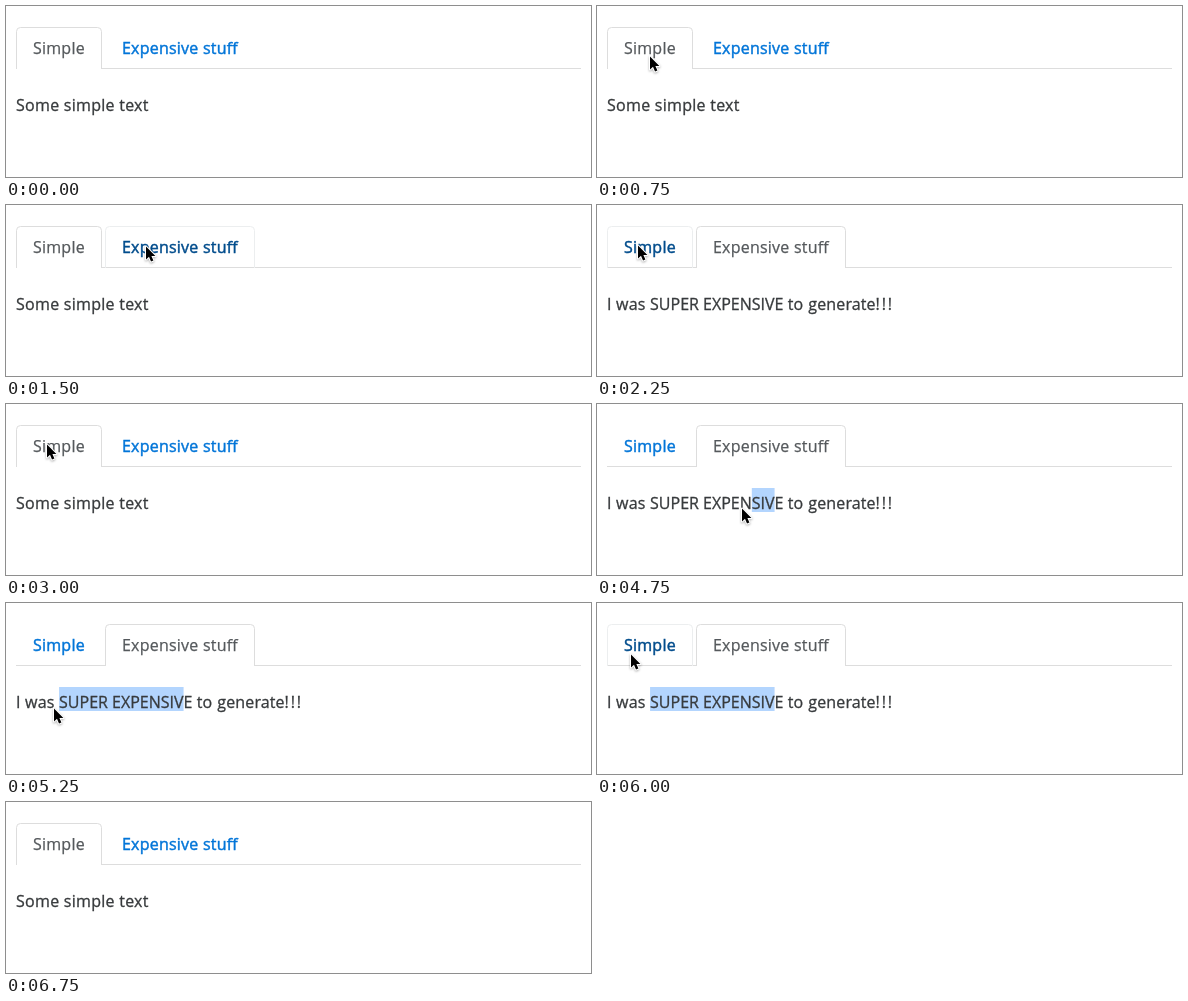
These frames come from a looping animation (585 px wide and 171 px high, 7.5 s). An HTML page:

```html
<!DOCTYPE html>
<html lang="en">
<head>
<meta charset="utf-8">
<title>Lazy tabs</title>
<style>
  html, body { margin: 0; width: 100%; height: 100%; overflow: hidden; background: #fff; }
  svg { display: block; width: 100%; height: 100%; }
  text {
    font: 16px "Open Sans", "Noto Sans", sans-serif;
    font-feature-settings: "liga" 1;
    letter-spacing: .22px;
    color: #373a3c;
    fill: currentColor; stroke: currentColor; stroke-width: .3px;
  }
  .tab path { fill: none; stroke: none; }
  .tab text { color: #0275d8; stroke-width: .45px; }
  .tab.hover path { stroke: #eceeef; }
  .tab.hover text { color: #014c8c; }
  .tab.active path { fill: #fff; stroke: #ddd; }
  .tab.active text { color: #55595c; stroke-width: .25px; }
  #plain { letter-spacing: .27px; }
  .caps { letter-spacing: 0; }
  .verb { letter-spacing: .12px; word-spacing: .9px; }
  .bangs { letter-spacing: 1.8px; }
  #cursor {
    fill: #000; stroke: #fff; stroke-width: 2; paint-order: stroke;
    stroke-linejoin: round;
    filter: drop-shadow(0 1px 1px rgba(0, 0, 0, .3));
  }
</style>
</head>
<body>
<svg viewBox="0 0 585 171">
  <rect id="selection" y="84" height="24" fill="#b3d5fe"/>
  <path d="M10 62.5H575" stroke="#ddd"/>
  <g class="tab" id="simple">
    <path d="M10.5 63V25.5a4 4 0 0 1 4 -4H91.5a4 4 0 0 1 4 4V63"/>
    <text x="27" y="48">Simple</text>
  </g>
  <g class="tab" id="costly">
    <path d="M99.5 63V25.5a4 4 0 0 1 4 -4H244.5a4 4 0 0 1 4 4V63"/>
    <text x="116" y="48">Expensive stuff</text>
  </g>
  <text id="plain" x="10" y="105">Some simple text</text>
  <text id="heavy" x="10" y="105">I was <tspan class="caps">SUPER EXPENSIVE </tspan><tspan class="verb">to generate</tspan><tspan class="bangs">!!!</tspan></text>
  <path id="cursor" d="M1 1.5V14.6L4 11.8L6 16.5L8.4 15.5L6.4 10.9H10.4Z"/>
</svg>
<script>
  const LOOP = 7500, STEP = 250;
  const $ = id => document.getElementById(id);

  // The pointer eases from rest to rest: start time, steps taken, x, y.
  const enter = { time: 250, x: 93, y: 56 }, leave = 6750;
  const moves = [
    [250, 1, 52, 49],
    [750, 3, 139, 40],
    [1750, 2, 40, 39],
    [3000, 3, 134, 39],
    [4000, 2, 176, 100],
    [4500, 1, 144, 103],
    [4750, 1, 61, 103],
    [5000, 1, 47, 104],
    [5500, 2, 33, 50]
  ];
  const clicks = [1750, 3000, 4000, 6500];
  const drag = { start: 4500, end: 5500, clear: 6500 };

  const tabs = [
    { el: $("simple"), body: $("plain"), left: 10, right: 96 },
    { el: $("costly"), body: $("heavy"), left: 99, right: 249 }
  ];
  const TAB_TOP = 21, TAB_BOTTOM = 64;

  const clamp = v => Math.min(1, Math.max(0, v));
  const easeOut = p => 1 - (1 - p) ** 2;
  const show = (el, on) => el.setAttribute("visibility", on ? "visible" : "hidden");

  function pointerAt(t) {
    let { x, y } = enter;
    for (const [start, steps, toX, toY] of moves) {
      const p = easeOut(clamp((t - start) / (steps * STEP)));
      x += (toX - x) * p;
      y += (toY - y) * p;
    }
    return { x: Math.round(x), y: Math.round(y), shown: t >= enter.time && t < leave };
  }

  const isOver = (tab, { x, y, shown }) =>
    shown && x >= tab.left && x < tab.right && y >= TAB_TOP && y < TAB_BOTTOM;

  // Selects backwards from the anchor to the first letter right of the pointer.
  function drawSelection(t) {
    const on = t >= drag.start && t < drag.clear;
    show($("selection"), on);
    if (!on) return;
    const text = $("heavy"), letters = text.textContent;
    const edge = i => text.getStartPositionOfChar(i).x;
    const anchor = letters.indexOf("E to");
    const { x } = pointerAt(Math.min(t, drag.end));
    let first = 0;
    while (first < anchor && (letters[first] === " " || edge(first) < x)) first++;
    $("selection").setAttribute("x", edge(first));
    $("selection").setAttribute("width", edge(anchor) - edge(first));
  }

  function draw(time) {
    const t = Math.floor(time / STEP) * STEP;
    const pointer = pointerAt(t);
    const active = tabs[clicks.filter(c => c <= t).length % 2];

    for (const tab of tabs) {
      const state = tab === active ? " active" : isOver(tab, pointer) ? " hover" : "";
      tab.el.setAttribute("class", "tab" + state);
      show(tab.body, tab === active);
    }
    drawSelection(t);
    show($("cursor"), pointer.shown);
    $("cursor").setAttribute("transform", `translate(${pointer.x} ${pointer.y})`);
  }

  const start = performance.now();
  function tick() {
    draw((performance.now() - start) % LOOP);
    requestAnimationFrame(tick);
  }
  tick();
</script>
</body>
</html>
```
